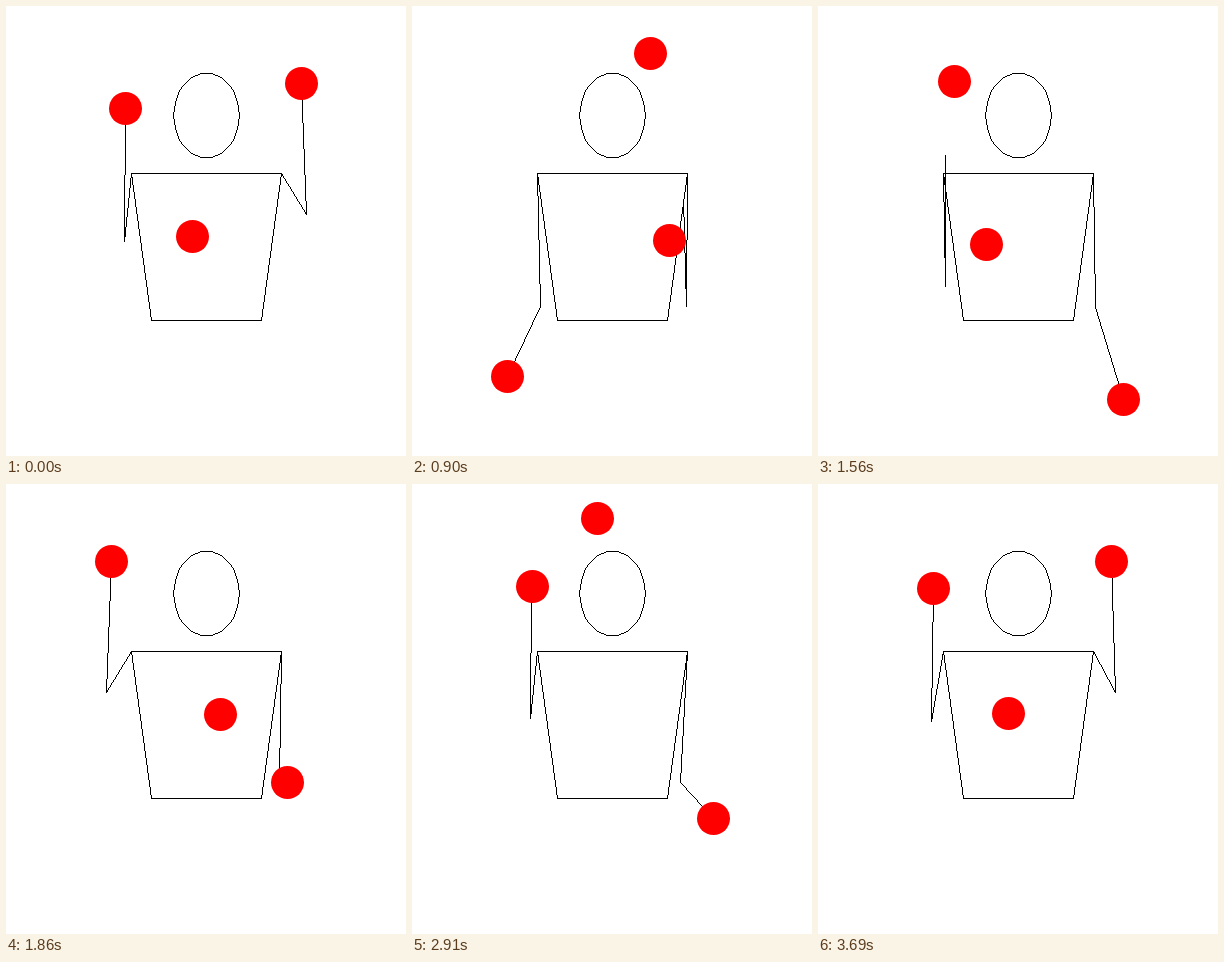
Animation, 400 px wide and 450 px high, one loop 3720 ms. Source, as an HTML page with a canvas:

```html
<!DOCTYPE html>
<html lang="en">
<head>
<meta charset="utf-8">
<title>Three-ball juggler</title>
<style>
  html, body { margin: 0; height: 100%; overflow: hidden; background: #fff; }
  canvas { display: block; }
</style>
</head>
<body>
<canvas id="stage" width="400" height="450"></canvas>
<script>
const ctx = document.getElementById('stage').getContext('2d');

const LOOP = 3720, STEP = 30, BEAT = 620;
const FLIGHT = 1.7, EMPTY = 0.7, DWELL = 1.3;   // in beats
const GRAVITY = 96.87;                          // px per beat squared, halved
const HIGH = 102.55, LOW = 298.15;
const throwHeights = [HIGH, HIGH, LOW, LOW, HIGH, LOW];
const handX = [119.45, 281.5], shoulderX = [125.5, 275.5], SHOULDER_Y = 167.6;
const REACH = 97.8, ARM = 133.7;                // hand depth, length of each arm half

const mod = (a, n) => ((a % n) + n) % n;

// Throws happen once per beat from alternating hands; even ones are left.
const throwPoint = i => [handX[mod(i, 2)], throwHeights[mod(i, 6)]];

function throwVelocity(i) {
  const [x0, y0] = throwPoint(i), [x1, y1] = throwPoint(i + 3);
  return [(x1 - x0) / FLIGHT, (y1 - y0) / FLIGHT - GRAVITY * FLIGHT];
}

// Latest event at or before the beat, among those equal to r modulo n.
const latest = (beat, r, n) => Math.floor((beat - r) / n) * n + r;

function hermite(p0, p1, v0, v1, h, u) {
  const s = u * u * (3 - 2 * u);
  return p0 + (p1 - p0) * s + h * (v0 * u * (1 - u) ** 2 + v1 * u * u * (u - 1));
}

// Clamped cubic spline: throw, catch, next throw from the catching place.
function handAt(side, beat) {
  const i = latest(beat, side, 2), t = beat - i;
  const from = throwPoint(i), to = throwPoint(i + 2);
  const v0 = throwVelocity(i), v2 = throwVelocity(i + 2);
  return [0, 1].map(c => {
    const v1 = (6 * (to[c] - from[c]) / EMPTY ** 2 - 2 * v0[c] / EMPTY - 2 * v2[c] / DWELL)
      / (4 / EMPTY + 4 / DWELL);
    return t < EMPTY
      ? hermite(from[c], to[c], v0[c], v1, EMPTY, t / EMPTY)
      : hermite(to[c], to[c], v1, v2[c], DWELL, (t - EMPTY) / DWELL);
  });
}

function ballAt(ball, beat) {
  const i = latest(beat, ball, 3), t = beat - i;
  if (t >= FLIGHT) return handAt(mod(i + 1, 2), beat);
  const [x, y] = throwPoint(i), [vx, vy] = throwVelocity(i);
  return [x + vx * t, y + vy * t + GRAVITY * t * t];
}

// The elbow hangs as low as the two equal arm halves allow.
function elbowAt(side, [x, y]) {
  const dx = x - shoulderX[side], dy = y - SHOULDER_Y;
  const dist = Math.hypot(dx, dy, REACH);
  const bend = Math.sqrt(Math.max(0, ARM * ARM - dist * dist / 4));
  const slope = dy / dist, level = Math.sqrt(1 - slope * slope);
  return [
    shoulderX[side] + dx / 2 - bend * slope * dx / dist / level,
    SHOULDER_Y + dy / 2 + bend * level
  ];
}

// One-pixel lines without smoothing.
function polyline(points) {
  ctx.fillStyle = '#000';
  const p = points.map(q => q.map(Math.floor));
  for (let k = 1; k < p.length; k++) {
    const [x, y] = p[k - 1], dx = p[k][0] - x, dy = p[k][1] - y;
    const n = Math.max(Math.abs(dx), Math.abs(dy), 1);
    for (let i = 0; i <= n; i++)
      ctx.fillRect(Math.round(x + dx * i / n), Math.round(y + dy * i / n), 1, 1);
  }
}

const torso = [[125, 167], [275, 167], [255, 314], [145, 314], [125, 167]];
const head = Array.from({ length: 41 }, (_, i) => {
  const a = i * Math.PI / 20;
  return [200.5 + 32.9 * Math.cos(a), 109.5 + 42.4 * Math.sin(a)];
});

function draw(ms) {
  const beat = ms / BEAT;
  ctx.fillStyle = '#fff';
  ctx.fillRect(0, 0, 400, 450);
  polyline(torso);
  polyline(head);
  for (const side of [0, 1]) {
    const hand = handAt(side, beat);
    polyline([[shoulderX[side], SHOULDER_Y], elbowAt(side, hand), hand]);
  }
  ctx.fillStyle = '#f00';
  for (let ball = 0; ball < 3; ball++) {
    const [x, y] = ballAt(ball, beat).map(v => Math.floor(v) + 0.5);
    ctx.beginPath();
    ctx.arc(x, y, 16.5, 0, 2 * Math.PI);
    ctx.fill();
  }
}

const start = performance.now();
function tick() {
  const ms = (performance.now() - start) % LOOP;
  draw(Math.floor(ms / STEP) * STEP);
  requestAnimationFrame(tick);
}
tick();
</script>
</body>
</html>
```
